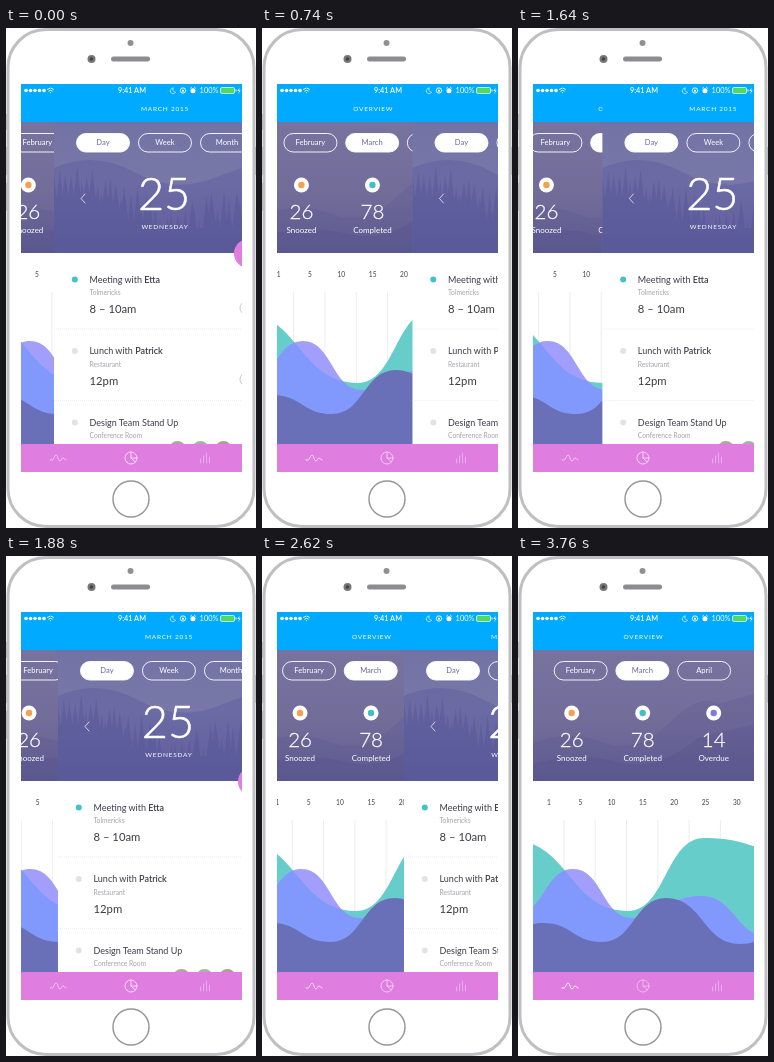
Recreate the animation shown at these times as an HTML page. Size 250 by 500 pixels, loop 3.78 s.

```html
<!DOCTYPE html>
<html>
<head>
<meta charset="utf-8">
<style>
  html, body { margin: 0; width: 100%; height: 100%; overflow: hidden; background: #fff; }
  svg { display: block; width: 250px; height: 500px; }
  text { font-family: Lato, "Open Sans", sans-serif; fill: #fff; }
  .mid { text-anchor: middle; }
  .title { font-size: 6.5px; letter-spacing: .75px; }
  .thin { font-weight: 300; stroke: #fff; stroke-width: .014em; }
  .ink { fill: #3c3c46; }
  .soft { fill: #a4a4aa; }
  .bold { font-weight: 600; }
  .line { fill: none; stroke: #fff; stroke-width: .9; stroke-linecap: round; stroke-linejoin: round; }
</style>
</head>
<body>
<svg viewBox="0 0 250 500">
  <defs>
    <clipPath id="screen"><rect x="15" y="56" width="221" height="388"/></clipPath>
    <clipPath id="tealArea"><path id="tealClip"/></clipPath>
    <clipPath id="photoArea"><rect y="94" width="222" height="131"/></clipPath>
    <linearGradient id="dusk" x2="0" y2="1">
      <stop stop-color="#77739f"/><stop offset=".55" stop-color="#726c99"/><stop offset="1" stop-color="#625e93"/>
    </linearGradient>
    <linearGradient id="mist" x2="0" y2="1">
      <stop stop-color="#7273a5"/><stop offset=".45" stop-color="#7877a8"/><stop offset="1" stop-color="#6665a0"/>
    </linearGradient>
  </defs>

  <!-- Phone body -->
  <g fill="#b9b9bd">
    <rect y="86" width="2" height="16"/><rect y="119" width="2" height="28"/>
    <rect y="155" width="2" height="28"/><rect x="248" y="119" width="2" height="28"/>
  </g>
  <rect x="2" y="1.500" width="246" height="497" rx="38" fill="#fff" stroke="#bfbfc2" stroke-width="3"/>
  <circle cx="124.500" cy="15" r="3" fill="#919194"/>
  <circle cx="85.500" cy="31" r="4" fill="#77777b"/><circle cx="85.500" cy="31" r="1.800" fill="#45454f"/>
  <rect x="105" y="28.500" width="39" height="5" rx="2.500" fill="#8d8d91"/>
  <circle cx="125" cy="471" r="18" fill="#fff" stroke="#98989c" stroke-width="1.500"/>

  <g clip-path="url(#screen)">
    <rect x="14" y="56" width="223" height="388" fill="#fff"/>
    <g id="overview"></g>
    <g id="calendar"></g>
    <g id="status"></g>
    <rect x="14" y="416" width="223" height="28" fill="#df7ee0"/>
    <path id="waveIcon" class="line" d="M44 432h2c2 0 2-5 4-5s2 6 4 6 1-3 3-3 1 2 3 2"/>
    <g id="pieIcon" class="line"><circle cx="125" cy="430" r="6"/><path d="M125 424v6l4.500 4M125 430h6"/></g>
    <path class="line" opacity=".4" d="M194.500 435v-4M197.500 435v-7M200.500 435v-10M203.500 435v-6"/>
  </g>
</svg>
<script>
const $ = id => document.getElementById(id);
const text = (x, y, size, cls, s) => `<text x="${x}" y="${y}" class="${cls}" style="font-size:${size}px">${s}</text>`;
const title = (x, y, s) => `<text x="${x}" y="${y}" class="mid title">${s}</text>`;
const circle = (x, y, r, fill) => `<circle cx="${x}" cy="${y}" r="${r}" fill="${fill}"/>`;
const path = (d, fill, more = '') => `<path d="${d}" fill="${fill}" ${more}/>`;

function pill(x, label, active) {
  return `<rect x="${x - 26.5}" y="105.500" width="53" height="18.500" rx="9.250" stroke="#fff" stroke-width=".9" fill="${active ? '#fff' : 'none'}"/>` +
    `<text x="${x}" y="117.400" class="mid" style="font-size:7.600px;${active ? 'fill:#6a689f' : ''}">${label}</text>`;
}

// Area under a wave through its peaks and troughs
function area(points) {
  let [px, py] = points[0], d = `M${px} 416V${py}`;
  for (const [x, y] of points.slice(1)) {
    const m = (px + x) / 2;
    d += `C${m} ${py} ${m} ${y} ${x} ${y}`;
    [px, py] = [x, y];
  }
  return d + 'V416Z';
}

function drawOverview() {
  const teal = area([[-8, 284], [110, 355], [186, 282], [290, 300]]);
  const violet = area([[-2, 358], [55, 313], [114, 362], [183, 340], [252, 381]]);
  const front = area([[-25, 385], [25, 367], [84, 386], [148, 342], [222, 388], [280, 365]]);
  $('tealClip').setAttribute('d', teal);

  let s = `<rect x="14" y="56" width="223" height="38" fill="#00aaff"/>` + title(125.5, 82.5, 'OVERVIEW') +
    `<rect x="14" y="94" width="223" height="131" fill="url(#dusk)"/>` +
    path('M14 188Q50 172 84 186T150 168T200 148L237 138V225H14Z', '#55528d', 'opacity=".22"') +
    path('M14 208Q60 196 100 206T180 182L237 168V225H14Z', '#504d8a', 'opacity=".25"');
  ['February', 'March', 'April'].forEach((m, i) => s += pill(62.7 + i * 61.7, m, i == 1));
  [['26', 'Snoozed', '#f6a04d'], ['78', 'Completed', '#42bfc5'], ['14', 'Overdue', '#7d7ae6']].forEach(([n, label, color], i) => {
    const x = 53.7 + i * 71;
    s += circle(x, 157, 7.5, '#fff') + circle(x, 157, 3.2, color) +
      text(x, 191, 20.5, 'mid thin', n) + text(x, 204.5, 8, 'mid', label);
  });
  [1, 5, 10, 15, 20, 25, 30].forEach((n, i) => {
    const x = 31 + i * 31.3;
    s += text(x, 249, 6.6, 'mid ink', n);
    if (i < 6) s += `<path d="M${x + 14.9} 264V416" stroke="#e9e9ed" stroke-width=".8"/>`;
  });
  $('overview').innerHTML = s + path(teal, '#66cdca') + path(violet, '#a29ffc') +
    path(violet, '#8199fd', 'clip-path="url(#tealArea)"') + path(front, '#6a70b8');
}

function forest() {
  let seed = 7, s = '';
  const random = () => (seed = seed * 16807 % 2147483647) / 2147483647;
  for (let i = 0; i < 46; i++) {
    const x = i * 5 + random() * 4, side = Math.abs(x - 125) / 125;
    const top = 176 - side * 55 + random() * 26, w = 5 + random() * 4;
    s += `M${x} ${top}l${w} 60h${-2 * w}z`;
  }
  return path('M0 140Q40 122 80 144T160 150T223 134V225H0Z', '#55559a', 'opacity=".35"') +
    path(s + 'M0 200H223V225H0Z', '#4e4d92', 'opacity=".35"');
}

function drawCalendar() {
  let s = `<rect y="56" width="222" height="38" fill="#00aaff"/><rect y="225" width="222" height="219" fill="#fff"/>` +
    title(111, 82.5, 'MARCH 2015') +
    `<rect y="94" width="222" height="131" fill="url(#mist)"/><g clip-path="url(#photoArea)">${forest()}</g>`;
  ['Day', 'Week', 'Month'].forEach((label, i) => s += pill(49 + i * 62, label, i == 0));
  s += '<path class="line" opacity=".8" d="M31 166l-4 4.500 4 4.500M191 166l4 4.500-4 4.500"/>' +
    text(110, 182, 45, 'mid thin', '25') + title(111, 200.5, 'WEDNESDAY') + circle(194.5, 225.5, 14.5, '#df7ee0') +
    '<path class="line" d="M190 225.500h9M194.500 221v9"/>';

  const b = name => `<tspan class="bold">${name}</tspan>`;
  [['Meeting with ' + b('Etta'), 'Tolmericks', '8 – 10am'],
   ['Lunch with ' + b('Patrick'), 'Restaurant', '12pm'],
   ['Design Team Stand Up', 'Conference Room', '']].forEach(([what, where, when], i) => {
    const y = i * 71.5;
    s += circle(20.8, 251.5 + y, 3, i ? '#e3e3e6' : '#42c3c4') + text(35.5, 254.5 + y, 9, 'ink', what) +
      text(35.5, 267 + y, 6.7, 'soft', where) + text(35.5, 285 + y, 11.3, 'ink', when);
    if (i < 2) s += `<path d="M0 ${301 + y}H222" stroke="#e6e6ea" stroke-width=".7" stroke-dasharray="1 1"/>` +
      `<circle cx="193" cy="${280 + y}" r="7" fill="none" stroke="#bcbcc2" stroke-width=".8"/>`;
  });
  ['#b4a49b', '#a9b3a2', '#b79a92'].forEach((color, i) => s += circle(123.5 + i * 23, 421.5, 8.5, color) + circle(123.5 + i * 23, 419, 3, '#75675f'));
  $('calendar').innerHTML = s;
}

function drawStatus() {
  let s = '';
  for (let i = 0; i < 5; i++) s += circle(20 + i * 4.5, 62.5, 1.8, '#fff');
  $('status').innerHTML = s +
    '<path class="line" d="M41.500 61.200q3-2.600 6 0M42.700 63q1.800-1.600 3.600 0M44.500 64.700h.1"/>' +
    text(126, 65.2, 7.3, 'mid bold', '9:41 AM') +
    '<path class="line" opacity=".7" d="M167 60a2.800 2.800 0 1 0 2.500 4.200a3 3 0 0 1-2.500-4.200"/>' +
    '<circle class="line" cx="177" cy="62.500" r="2.700"/><rect x="176" y="61.800" width="2" height="1.800" fill="#fff"/>' +
    '<circle cx="187" cy="62.800" r="2.500" fill="#fff"/><path class="line" d="M184.500 60.200l1-.8M189.500 60.200l-1-.8"/>' +
    text(203, 65.2, 7.4, 'mid', '100%') +
    '<rect x="214.500" y="59.500" width="14" height="6" rx="1.300" fill="#4cd964" stroke="#fff" stroke-width=".7"/>' +
    '<path d="M230 61.500v2" stroke="#fff"/><path d="M233.500 59.500l-2 3.400h1.500l-.6 3 2.200-3.700h-1.500z" fill="#fff"/>';
}

// Drag positions of the calendar's left edge: [time, x]
const LOOP = 3780, REST = 236, OPEN = 15;
const drag = [[0, 48], [1020, 172], [2000, 47.5], [3240, REST], [LOOP, REST]];

function edgeAt(t) {
  const i = drag.findIndex(([end]) => end > t);
  const [t0, x0] = drag[i - 1], [t1, x1] = drag[i];
  return x0 + (x1 - x0) * (1 - Math.cos(Math.PI * (t - t0) / (t1 - t0))) / 2;
}

function frame() {
  const x = edgeAt(performance.now() % LOOP);
  const progress = (REST - x) / (REST - OPEN);
  $('calendar').setAttribute('transform', `translate(${x})`);
  $('overview').setAttribute('transform', `translate(${(x - REST) / 6})`);
  $('waveIcon').setAttribute('opacity', 1 - .55 * progress);
  $('pieIcon').setAttribute('opacity', .5 + .35 * progress);
  requestAnimationFrame(frame);
}

drawOverview();
drawCalendar();
drawStatus();
frame();
</script>
</body>
</html>
```
